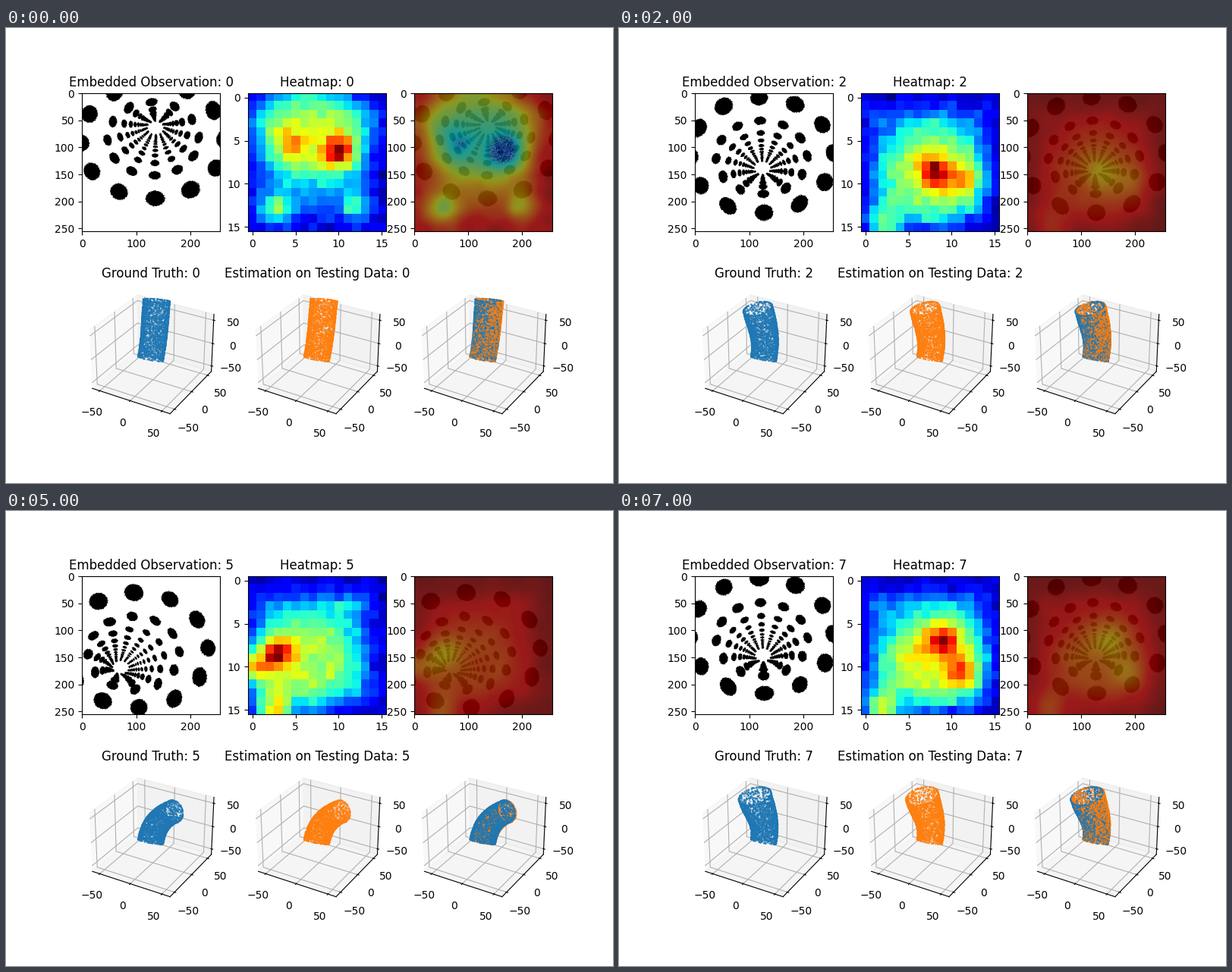
These frames come from a looping animation (800 by 600 pixels, 8000 ms). A matplotlib script:

```python
import numpy as np
import matplotlib.pyplot as plt
from matplotlib.animation import FuncAnimation

N = 256
BLUE, ORANGE = (0.122, 0.467, 0.706), (1.0, 0.498, 0.055)
JET = plt.get_cmap("jet")
BASE_LEFT, BASE_RIGHT = np.array([174, 433.0]), np.array([207, 439.0])


def state(ring, vanish, tip_left, tip_right, glow, *spots):
    """Key points of one sample; spots are (column, row, height)."""
    return np.array([ring, vanish, tip_left, tip_right, glow], float), np.array(spots)


def between(a, b):
    return tuple((p + q) / 2 for p, q in zip(a, b))


straight = state((130, 89), (137, 58), (181, 358), (216, 361), (7, 3.5),
                 (10, 6.4, .5), (4.4, 5.3, .22), (3, 13, .28), (12, 13, .2))
upright = state((122, 120), (123, 145), (165, 373), (201, 364), (7.5, 9),
                (7.5, 11.4, .42), (12, 9, .25), (8.5, 7, .18), (2.5, 14.8, .35))
nodding = state((123, 110), (126, 146), (163, 377), (203, 367), (8, 9),
                (9, 6.5, .42), (10.8, 10, .28), (5.5, 8.5, .1), (2, 14.5, .45))
curled = state((100, 137), (63, 178), (216, 382), (227, 410), (6, 9.5),
               (3, 8.5, .45), (0, 10, .42), (2.5, 15, .5), (11, 3, .1))
leaning = state((112, 85), (66, 30), (222, 361), (248, 374), (5, 4),
                (7, 4, .45), (.3, 6, .42), (3, 7.8, .2), (7.5, 0, .3),
                (6.3, 12.7, .4))
bowed = state((123, 111), (126, 156), (158, 382), (200, 370), (8, 9.5),
              (9, 7, .42), (11, 10.4, .28), (5.5, 9, .1), (2, 14.7, .48))
STATES = [straight, upright, between(upright, nodding), nodding,
          between(nodding, curled), curled, leaning, bowed]


def inner_view(ring, vanish, seed):
    """Rings of twelve dots shrinking along the inside of a bent tube."""
    yy, xx = np.mgrid[:N, :N].astype(float)
    rng = np.random.default_rng(seed)
    edge = 1 + rng.normal(0, 0.06, (N, N))
    img = np.ones((N, N))
    for k in range(14):
        s = 1 / (1 + 0.57 * k)
        mid = ring + (vanish - ring) * (1 - s) ** 2
        for a in np.radians(88 + 30 * np.arange(12)):
            x, y = mid + s * np.array([132 * np.cos(a), 106 * np.sin(a)])
            ray = np.array([x, y]) - vanish
            c, d = ray / np.hypot(*ray)
            dx, dy = xx - x, yy - y
            across = max(17 * s, 1.5) * rng.uniform(0.92, 1.08)
            along = max(14.5 * s ** 1.3, 1.5) * rng.uniform(0.92, 1.08)
            q = ((dx * c + dy * d) / along) ** 2 + ((dy * c - dx * d) / across) ** 2
            img[q < edge] = 0
    return img


def heat_field(glow, spots, seed):
    """A wide flat glow and small hot spots, dimmer towards the border."""
    y, x = np.mgrid[:16, :16].astype(float)
    border = np.minimum(np.minimum(x + 1, 15 - x), np.minimum(y, 15 - y))
    h = 0.08 + 0.05 * np.clip(border, 0, 3)
    h += np.random.default_rng(seed).normal(0, 0.03, h.shape)
    h += 0.32 * np.exp(-(np.hypot(x - glow[0], y - glow[1]) / 6.3) ** 4)
    for cx, cy, height in spots:
        h += height * np.exp(-((x - cx) ** 2 + (y - cy) ** 2) / 3.2)
    h = np.clip(h, 0, None)
    return h / h.max()


def overlay(img, heat, gain):
    grid = (np.arange(N) + 0.5) / 16 - 0.5
    w = np.exp(-((grid[:, None] - np.arange(16)) / 0.6) ** 2 / 2)
    w /= w.sum(1, keepdims=True)
    v = gain * (w @ heat @ w.T)
    v += np.random.default_rng(4).normal(0, 0.15, v.shape) * (v > 0.7)
    rgb = JET(np.clip(v, 0, 1))[..., 2::-1]
    return np.clip(0.5 * rgb + 0.1 * img[..., None], 0, 1)


# Screen directions of the default 3D view
RIGHT = np.array([np.sqrt(3) / 2, 0.5, 0])
UP = np.array([-0.25, np.sqrt(3) / 4, np.sqrt(3) / 2])
NEAR = np.array([np.sqrt(3) / 4, -0.75, 0.5])
HALF = np.array([4, 4, 3]) * 1.8294640721620434 * 25 / 24 / np.sqrt(41) / 2
LIM = 62.5


def to_data(x, y, depth):
    c = depth / 98.57
    k = (1 - c / 10) / 98.57
    a, b = (x - 193.6) * k, (426.5 - y) * k
    return (np.outer(a, RIGHT) + np.outer(b, UP) + np.outer(c, NEAR)) * LIM / HALF


def normal_to(v):
    n = np.stack([v[..., 1], -v[..., 0]], -1)
    return n / np.linalg.norm(n, axis=-1, keepdims=True)


def side(start, end, n0, n1, t):
    """Cubic from base to tip that leaves along n0 and arrives along n1."""
    reach = 0.4 * np.hypot(*(end - start))
    t = t[:, None]
    return ((1 - t) ** 3 * start + 3 * t * (1 - t) ** 2 * (start + reach * n0)
            + 3 * t ** 2 * (1 - t) * (end - reach * n1) + t ** 3 * end)


def tube(left, right, length, seed, shift=0, front=0):
    rng = np.random.default_rng(seed)
    t = np.concatenate([rng.random(2600), np.zeros(60), np.ones(110)])
    phi = rng.random(t.size) * 2 * np.pi
    n0, n1 = normal_to(BASE_RIGHT - BASE_LEFT), normal_to(right - left)
    lo = side(BASE_LEFT, left, n0, n1, t)
    across = side(BASE_RIGHT, right, n0, n1, t) - lo
    # A shorter tube on screen turns its open end more to the viewer
    bulge = np.clip(0.6 * (80 - length), 2, 11)
    swell = (2 + (bulge - 2) * t) * np.sin(phi)
    p = lo + across * (1 - np.cos(phi[:, None])) / 2
    p += normal_to(across) * swell[:, None]
    return to_data(p[:, 0] + shift * t, p[:, 1], front - 16 * np.sin(phi))


def scene(i):
    (ring, vanish, left, right, glow), spots = STATES[i]
    length = np.hypot(*(left + right - BASE_LEFT - BASE_RIGHT)) / 2
    img = inner_view(ring, vanish, i)
    heat = heat_field(glow, spots, i)
    mixed = overlay(img, heat, np.interp(length, [70, 76], [0.36, 0.95]))
    truth = tube(left, right, length, 20 + i, front=max(0, 60 - length) * 2)
    guess = tube(left, right, length, 40 + i, shift=1.5)
    return img, heat, mixed, truth, guess


scenes = [scene(i) for i in range(8)]

fig = plt.figure(figsize=(8, 6), dpi=100)
flat = [fig.add_subplot(2, 3, k) for k in (1, 2, 3)]
deep = [fig.add_subplot(2, 3, k, projection="3d") for k in (4, 5, 6)]


def cloud(ax, points, colors):
    ax.scatter(*points.T, s=1, c=colors, linewidths=0.7, alpha=0.6,
               depthshade=False)
    ax.set_xlim(-LIM, LIM)
    ax.set_ylim(-LIM, LIM)
    ax.set_zlim(-LIM, LIM)


def draw(i):
    img, heat, mixed, truth, guess = scenes[i]
    for ax in flat + deep:
        ax.cla()
    flat[0].imshow(img, cmap="gray", vmin=0, vmax=1)
    flat[1].imshow(heat, cmap="jet", vmin=0, vmax=1)
    flat[2].imshow(mixed)
    blue, orange = [BLUE] * len(truth), [ORANGE] * len(guess)
    cloud(deep[0], truth, blue)
    cloud(deep[1], guess, orange)
    cloud(deep[2], np.vstack([truth, guess]), blue + orange)
    titles = ("Embedded Observation", "Heatmap",
              "Ground Truth", "Estimation on Testing Data")
    for ax, name in zip(flat[:2] + deep[:2], titles):
        ax.set_title(f"{name}: {i}")
    return []


anim = FuncAnimation(fig, draw, frames=8, interval=1000, repeat=True,
                     repeat_delay=0, init_func=lambda: draw(0))
plt.show()
```
